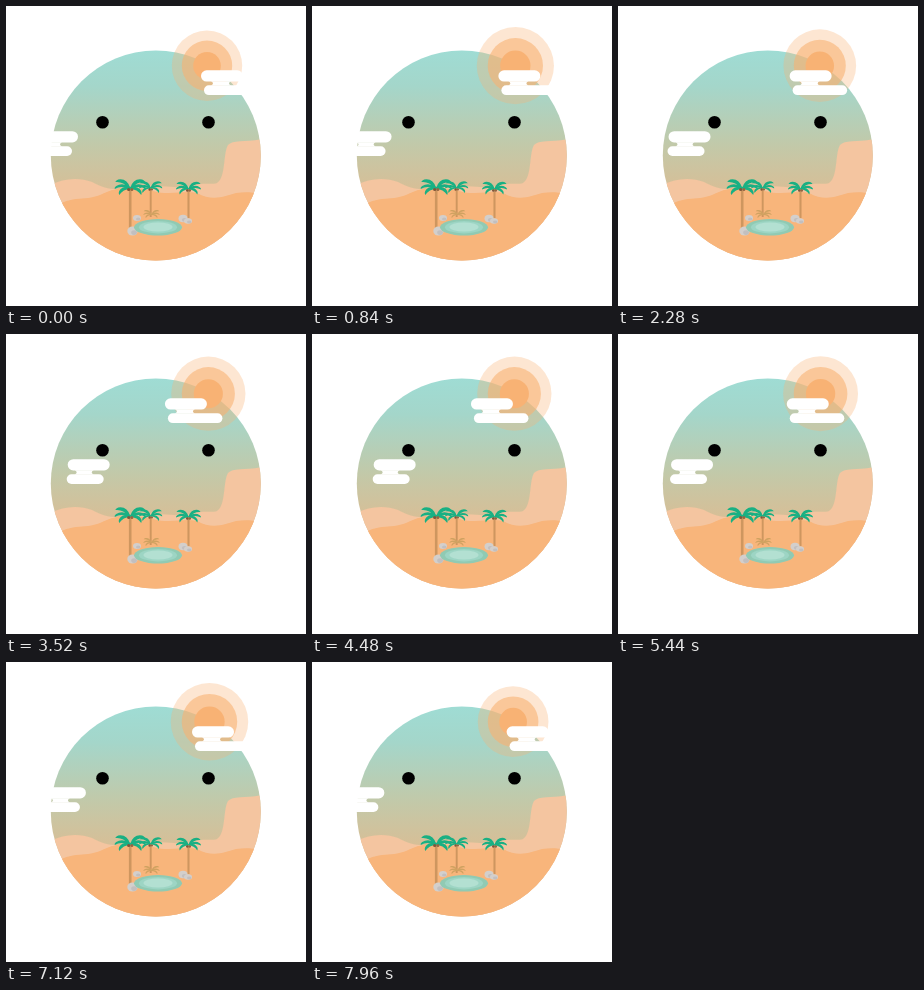
Animation, 300 px wide and 300 px high, one loop 8 s. Source, as an HTML page with a canvas:

```html
<!DOCTYPE html>
<html lang="en">
<head>
<meta charset="utf-8">
<title>Desert face</title>
<style>
html, body { margin: 0; width: 100%; height: 100%; overflow: hidden; background: #fff; }
canvas { display: block; width: 300px; height: 300px; }
</style>
</head>
<body>
<canvas id="stage"></canvas>
<script>
const LOOP = 8000;
const canvas = document.getElementById('stage');
const ctx = canvas.getContext('2d');
const dpr = window.devicePixelRatio || 1;
canvas.width = canvas.height = 300 * dpr;

// Triangle wave: 0 to 1 and back within one period.
const swing = (t, period) => 1 - Math.abs(1 - 2 * (t % period) / period);

function ellipse(x, y, rx, ry, color) {
  ctx.fillStyle = color;
  ctx.beginPath();
  ctx.ellipse(x, y, rx, ry, 0, 0, Math.PI * 2);
  ctx.fill();
}

const disc = (x, y, r, color) => ellipse(x, y, r, r, color);

function shape(path, color) {
  ctx.fillStyle = color;
  ctx.fill(new Path2D(path));
}

function line(path, color, width) {
  ctx.strokeStyle = color;
  ctx.lineWidth = width;
  ctx.stroke(new Path2D(path));
}

function crown(x, y, s, color) {
  ctx.save();
  ctx.translate(x, y);
  ctx.scale(s, s);
  for (const side of [-1, 1]) {
    ctx.save();
    ctx.scale(side, 1);
    shape('M0 1 Q3 -9 12 -7.5 Q14 -7 15 -5 Q7 -6 2 1Z', color);
    shape('M0 0 Q8 -5 14 -1 Q16 0 15.5 2 Q9 -2 1 2Z', color);
    shape('M0 0 Q8 -1 11 4 Q12 6 11 8 Q7 2 0 2Z', color);
    ctx.restore();
  }
  ctx.restore();
}

function palm(x, top, bottom, s) {
  line(`M${x} ${top} L${x} ${bottom}`, '#ce965f', 2.6 * s);
  crown(x, top - 1, s, '#19b083');
  disc(x - 1.5 * s, top + 1.5, 1.6 * s, '#80573a');
  disc(x + 1.7 * s, top + 1.5, 1.5 * s, '#946643');
}

function rock(x, y, w, h) {
  ellipse(x, y, w, h, '#d3cfcc');
  ellipse(x + w * 0.3, y + h * 0.35, w * 0.55, h * 0.5, '#c2bfbf');
}

function oasis() {
  palm(144.7, 182, 211, 0.74);
  crown(145.5, 208, 0.52, '#d0a261');
  rock(131, 212, 4, 3);
  palm(124.2, 182, 222, 1);
  palm(182.5, 183, 212, 0.8);
  rock(177, 212.5, 4.5, 3.7);
  rock(182, 215, 4, 2.8);
  rock(126.5, 225, 5.2, 4.6);
  ellipse(152, 221.3, 24, 8.2, '#90cab3');
  ellipse(152, 221.2, 19, 6.2, '#9dd5c4');
  ellipse(152, 221, 14.5, 4.6, '#b3e0d2');
}

function face() {
  ctx.save();
  ctx.beginPath();
  ctx.arc(149.8, 149.5, 105, 0, Math.PI * 2);
  ctx.clip();
  const sky = ctx.createLinearGradient(0, 44, 0, 190);
  sky.addColorStop(0, '#9fdcd4');
  sky.addColorStop(0.25, '#a4d6ca');
  sky.addColorStop(0.65, '#c2c9a9');
  sky.addColorStop(1, '#dabd94');
  ctx.fillStyle = sky;
  ctx.fillRect(40, 40, 220, 220);
  shape('M40 182 C55 172 72 171 86 176 C102 185 112 184 126 181 C145 176 165 184 184 180 ' +
    'C198 176 205 179 211 177 C220 172 217 147 222 139 C227 133 241 137 260 132 V260 H40Z', '#f4c5a0');
  shape('M40 209 C60 187 77 196 94 189 C113 179 130 181 147 185 C165 190 176 184 191 187 ' +
    'C207 196 219 190 230 187 C241 185 249 187 260 188 V260 H40Z', '#f8b57b');
  oasis();
  ctx.restore();
}

function sun(t) {
  const p = swing(t, 2000);
  const s = 1 + 0.115 * p;
  const x = 201 + 2.8 * p;
  disc(x, 59.7, 35.2 * s, 'rgba(248,178,115,0.32)');
  disc(x, 59.7, 25.2 * s, 'rgba(248,178,115,0.6)');
  disc(x, 59.7, 13.8 * s, '#f8b274');
}

function bar(x, y, w, h) {
  ctx.beginPath();
  ctx.roundRect(x, y, w, h, h / 2);
  ctx.fill();
}

// Two rounded bars joined by a neck with scooped sides.
function cloud(x, y, topW, shift, lowW, neckL, neckR) {
  ctx.save();
  ctx.translate(x, y);
  ctx.fillStyle = '#fff';
  bar(0, 0, topW, 11.3);
  bar(shift, 15, lowW, 9.8);
  shape(`M${neckL - 2} 11 Q${neckL + 2} 13.2 ${neckL - 2} 15.3 ` +
    `H${neckR + 2} Q${neckR - 2} 13.2 ${neckR + 2} 11Z`, '#fff');
  ctx.restore();
}

function draw(t) {
  ctx.setTransform(dpr, 0, 0, dpr, 0, 0);
  ctx.fillStyle = '#fff';
  ctx.fillRect(0, 0, 300, 300);
  face();
  sun(t);
  const drift = swing(t, LOOP);
  cloud(195 - 41 * drift, 64.3, 42, 3, 54.5, 12, 28);
  cloud(30 + 36 * drift, 125.2, 42, -1, 37, 9, 24);
  disc(96.5, 116.3, 6.3, '#000');
  disc(202.5, 116.3, 6.3, '#000');
}

const start = performance.now();
function tick() {
  draw((performance.now() - start) % LOOP);
  requestAnimationFrame(tick);
}
tick();
</script>
</body>
</html>
```
